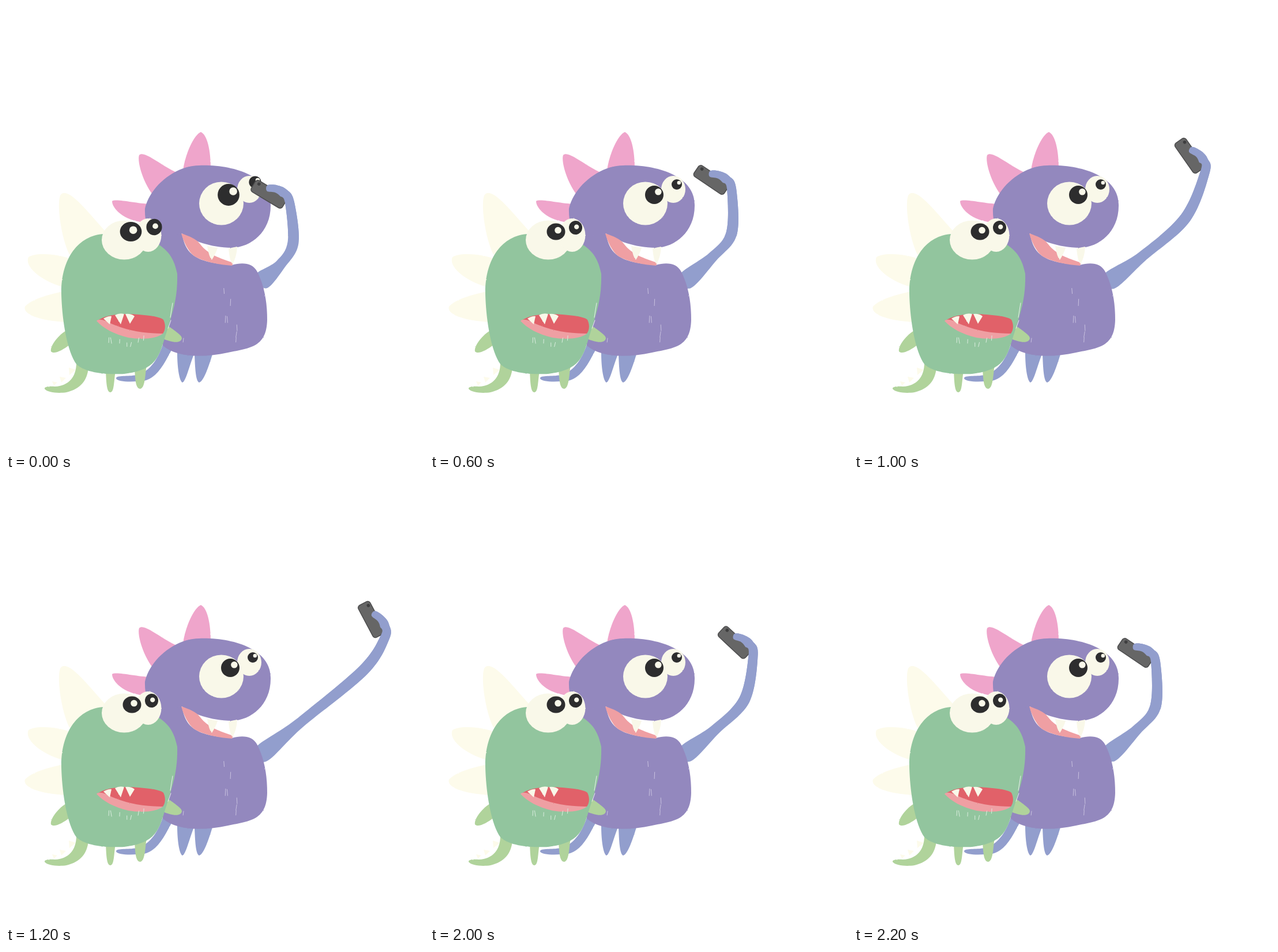
Recreate the animation shown at these times as an HTML page. Size 725 px wide and 773 px high, loop 2400 ms.

```html
<!DOCTYPE html>
<html lang="en">
<head>
<meta charset="utf-8">
<title>Monster selfie</title>
<style>
  html, body { margin: 0; width: 100%; height: 100%; overflow: hidden; background: #fff; }
  svg { display: block; width: 100%; height: 100%; }
  .cream { fill: #f9f8e9; }
  .pale { fill: #fdfbeb; }
  .pink { fill: #efa5cb; }
  .violet { fill: #9388be; }
  .blue { fill: #929ecd; }
  .green { fill: #92c59e; }
  .lime { fill: #b0d39b; }
  .lip { fill: #ef9fa3; }
  .red { fill: #e16169; }
  .ink { fill: #2d2d2e; }
  .mark { fill: none; stroke-linecap: round; }
</style>
</head>
<body>
<svg viewBox="0 0 725 773">
  <defs>
    <filter id="rough" filterUnits="userSpaceOnUse" x="0" y="0" width="725" height="773" color-interpolation-filters="sRGB">
      <feTurbulence type="fractalNoise" baseFrequency=".35" numOctaves="2" seed="4"/>
      <feDisplacementMap in="SourceGraphic" scale="1.6" xChannelSelector="R" yChannelSelector="G"/>
    </filter>
    <clipPath id="upper"><rect width="725" height="400"/></clipPath>
  </defs>

  <path id="arm" class="blue"/>

  <g filter="url(#rough)">
    <!-- tall monster -->
    <g class="pink">
      <path d="M307 285C312 252 328 222 338 219C350 224 355 255 355 281Z"/>
      <path d="M258 332C238 309 227 270 231 259C240 250 272 280 300 291L270 322Z"/>
      <path d="M184 339C190 334 225 343 250 344L240 376C205 373 184 352 184 339Z"/>
    </g>
    <g class="blue">
      <path d="M297 602C297 630 301 652 306 654C312 652 318 625 326 605Z"/>
      <path d="M327 605C328 630 329 652 335 654C343 652 352 625 359 602Z"/>
      <path d="M272 588C262 618 246 637 226 641C212 644 190 641 191 647C194 654 222 653 240 651C264 645 276 618 288 596Z"/>
    </g>
    <g class="violet">
      <path d="M335 277C395 275 459 296 459 345C460 392 425 419 392 420C352 419 325 408 305 395L275 425C250 410 240 380 241 352C250 312 295 277 335 277Z"/>
      <path d="M305 395C312 430 325 445 392 450C410 445 428 446 436 462C450 490 453 520 453 545C452 592 425 594 385 602C340 612 295 610 272 590L262 470L275 400Z"/>
    </g>
    <path class="lip" d="M304 395C318 400 330 404 337 414C350 431 370 438 394 446L392 451C365 449 340 443 326 434C316 426 308 410 304 395Z"/>
    <path class="cream" d="M349 417Q352 436 357 441Q364 430 367 420ZM386 421Q388 444 393 448Q400 436 401 418Z"/>
    <ellipse class="cream" cx="373.5" cy="343" rx="38.5" ry="37.5"/>
    <ellipse class="cream" cx="422" cy="318.5" rx="21" ry="23.5"/>
    <path id="tallMarks" class="mark" stroke="#c9c2e0"/>

    <!-- small monster -->
    <g class="pale">
      <path d="M110 432C95 400 88 345 94 329C106 309 146 363 173 392Z"/>
      <path d="M100 488C70 482 30 455 39 436C55 427 90 432 108 438Z"/>
      <path d="M102 549C60 547 28 536 33 522C45 508 80 500 98 496Z"/>
      <path d="M110 641l-1-13 12 4ZM96 654l-3-10 11 2ZM83 659l-3-7 9 2Z"/>
    </g>
    <g class="lime">
      <path d="M104 564C88 574 76 592 78 600C83 606 98 598 111 588Z"/>
      <path d="M278 553C289 562 305 571 305 577C304 586 290 586 270 577Z"/>
      <path d="M173 634C174 650 174 671 181 671C188 671 187 650 190 634Z"/>
      <path d="M223 628C224 650 225 665 233 665C241 663 241 645 244 622Z"/>
      <path d="M122 620C122 645 108 660 85 661C75 660 66 661 67 665C72 672 92 673 105 671C130 665 141 650 143 628Z"/>
    </g>
    <path class="green" d="M170 396C125 398 95 440 96 500C97 545 106 600 122 622C140 640 185 640 205 639C265 632 266 605 279 565C290 530 298 505 297 465C290 430 275 420 250 405Z"/>
    <path class="red" d="M158 547C171 537 198 533 230 536C252 538 267 540 273 545C277 553 277 562 272 569L222 570Z"/>
    <path class="lip" d="M157 547C162 542 172 546 183 552C208 563 238 569 272 569C262 578 235 580 212 576C187 570 169 560 157 547Z"/>
    <path class="cream" d="M169 543Q178 538 183 539L180 553ZM189 537Q196 533 205 535L199 553ZM207 535Q217 534 223 539L215 552Z"/>
    <ellipse class="cream" cx="205" cy="406.5" rx="39" ry="34"/>
    <ellipse class="cream" cx="246.5" cy="398" rx="23" ry="29"/>
    <path id="smallMarks" class="mark" stroke="#dceee0"/>
    <path class="mark" stroke="#e9efee" d="M289 516l-4 25M286 546l-5 14"/>
  </g>

  <g id="pupils"></g>
  <g id="phone">
    <rect x="-31.5" y="-11.5" width="63" height="23" rx="5" fill="#666" stroke="#4d4d4e" stroke-width="1.5"/>
    <circle cx="-24" cy="-6.5" r="2.8" fill="#3e3e3f"/>
  </g>
  <use href="#arm" clip-path="url(#upper)"/>
</svg>
<script>
const $ = id => document.getElementById(id);
const mix = (a, b, k) => a.map((v, i) => v + (b[i] - v) * k);

// Closed Catmull-Rom curve through the points
function smooth(pts) {
  const n = pts.length, at = i => pts[(i + n) % n];
  let d = 'M' + pts[0];
  for (let i = 0; i < n; i++) {
    const [a, b, c, e] = [at(i - 1), at(i), at(i + 1), at(i + 2)];
    d += 'C' + mix(b, b.map((v, k) => v + c[k] - a[k]), 1 / 6) +
      ' ' + mix(c, c.map((v, k) => v + b[k] - e[k]), 1 / 6) + ' ' + c;
  }
  return d + 'Z';
}

// Limb outline around a centre line
function limb(mid, widths) {
  const left = [], right = [];
  mid.forEach(([x, y], i) => {
    const a = mid[Math.max(i - 1, 0)], b = mid[Math.min(i + 1, mid.length - 1)];
    const dx = b[0] - a[0], dy = b[1] - a[1], s = widths[i] / Math.hypot(dx, dy);
    left.push([x - dy * s, y + dx * s]);
    right.unshift([x + dy * s, y - dx * s]);
  });
  return smooth([...left, ...right]);
}

// The hand curls around the phone, so its points turn with it
const hand = [[-8, -7.5], [6, -14.5], [20, -15], [38, -6.5]];
const shoulder = [442, 479];
const armWidths = [5, 6.5, 8, 8, 9.5, 9, 15];
function reach({ phone: [x, y, turn], forearm, elbow }) {
  const a = turn * Math.PI / 180, c = Math.cos(a), s = Math.sin(a);
  const held = hand.map(([u, v]) => [x + u * c - v * s, y + u * s + v * c]);
  return limb([...held, forearm, elbow, shoulder], armWidths);
}

const near = { phone: [456, 327, 31], forearm: [498, 411], elbow: [476, 449] };
const low = { phone: [488, 302, 34], forearm: [523, 395], elbow: [490, 436] };
const high = { phone: [582, 260, 55], forearm: [575, 368], elbow: [500, 435] };
const far = { phone: [634, 244, 62], forearm: [620, 332], elbow: [508, 425] };
const between = {};
for (const part in low) between[part] = mix(low[part], high[part], .43);
const poses = [near, low, between, high, far];

// glint: its offset as a share of the pupil; dx, dy: shift while staring
const eyes = [
  { x: 389, y: 328, rx: 16, ry: 16, glint: .43, dx: -3, dy: 0 },
  { x: 428, y: 310, rx: 9, ry: 9, glint: .43, dx: 4, dy: -4 },
  { x: 218.5, y: 392, rx: 16, ry: 14.5, glint: .22, dx: -2, dy: 0 },
  { x: 252.5, y: 385, rx: 11.5, ry: 12, glint: .15, dx: 4.5, dy: -1 }
];
function pupil({ x, y, rx, ry, glint, dx, dy }, stare) {
  const k = stare ? 1.18 : 1;
  return `<g transform="translate(${x + dx * stare} ${y + dy * stare}) scale(${k})">
    <ellipse class="ink" rx="${rx}" ry="${ry}"/>
    <circle class="cream" cx="${rx * glint}" cy="${-ry * glint * .75}" r="${rx * .36}"/></g>`;
}

// Sparse crayon gaps, mostly upright
let seed = 7;
const random = () => (seed = seed * 16807 % 2147483647) / 2147483647;
function scratch(id, count, x, y, w, h) {
  let d = '';
  while (count--) d += `M${x + w * random()} ${y + h * random()}l${4 * random() - 2} ${5 + 9 * random()}`;
  $(id).setAttribute('d', d);
}
scratch('tallMarks', 8, 308, 485, 100, 100);
scratch('smallMarks', 7, 130, 572, 120, 14);

const beat = 200;
const order = [0, 0, 0, 1, 2, 3, 4, 4, 4, 3, 2, 1];
let shown = -1;

function draw(ms) {
  const i = order[Math.floor(ms / beat) % order.length];
  if (i === shown) return;
  shown = i;
  const [x, y, turn] = poses[i].phone;
  $('arm').setAttribute('d', reach(poses[i]));
  $('phone').setAttribute('transform', `translate(${x} ${y}) rotate(${turn})`);
  $('pupils').innerHTML = eyes.map(eye => pupil(eye, i === 0 ? 1 : 0)).join('');
}

const start = performance.now();
function tick() {
  draw(performance.now() - start);
  requestAnimationFrame(tick);
}
tick();
</script>
</body>
</html>
```
